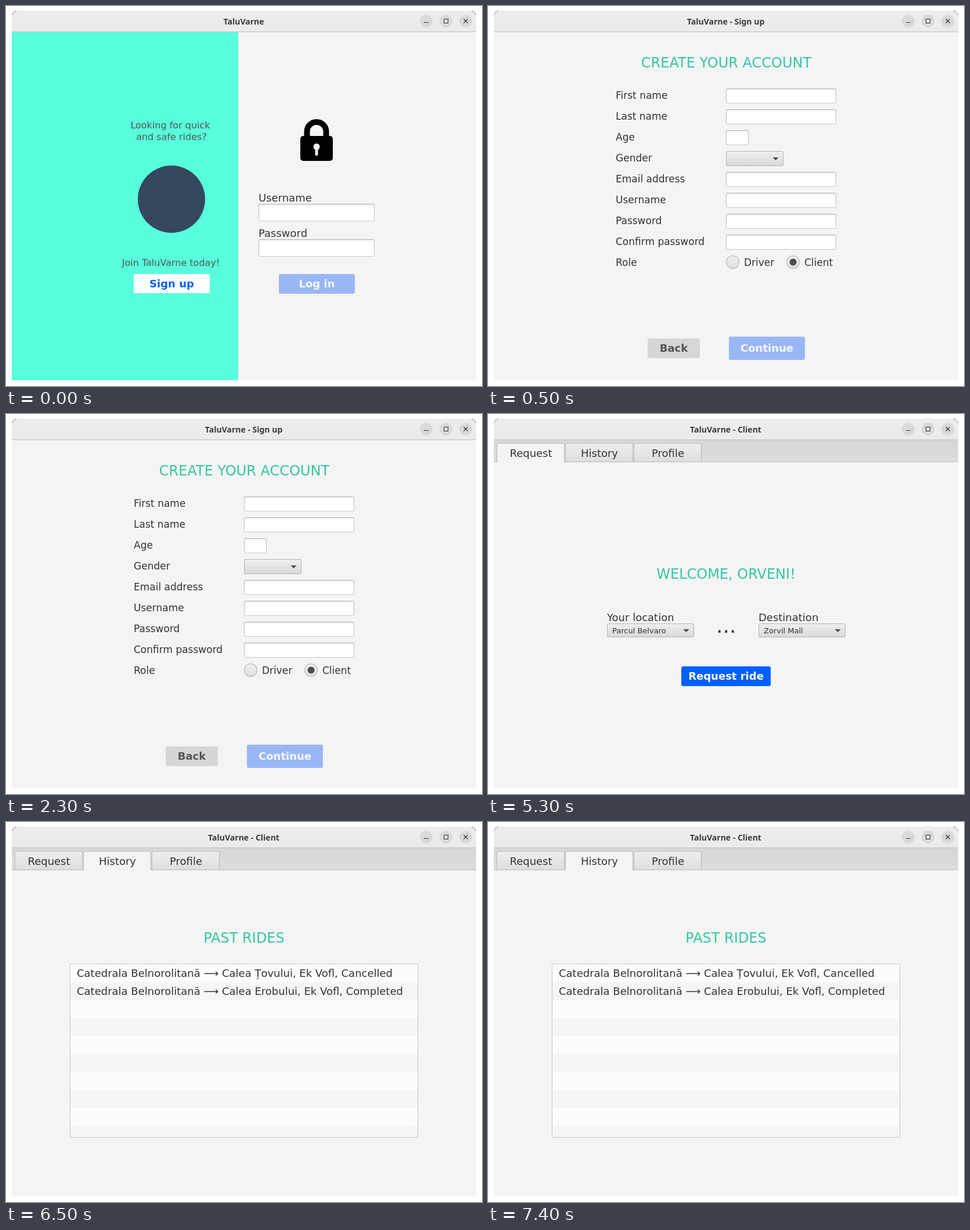
Write an HTML page with a canvas that moves like this. It is 820 px wide and 655 px high and loops after 8000 ms.

```html
<!DOCTYPE html>
<html lang="en">
<head>
<meta charset="utf-8">
<title>TaluVarne</title>
<style>
  html, body { margin: 0; width: 100%; height: 100%; overflow: hidden; background: #fff; }
  canvas { display: block; }
</style>
</head>
<body>
<canvas id="stage" width="820" height="655"></canvas>
<script>
const ctx = document.getElementById('stage').getContext('2d');
const APP = 'TaluVarne';
const SANS = '"DejaVu Sans", sans-serif';
const BG = '#f4f4f4', INK = '#333', TEAL = '#34c6a3', BLUE = '#0060ff', PALE_BLUE = '#9ab7f5';

function text(str, x, y, size, { color = INK, bold = false, align = 'left', family = SANS } = {}) {
  ctx.font = `${bold ? 'bold ' : ''}${size}px ${family}`;
  ctx.fillStyle = color;
  ctx.textAlign = align;
  ctx.fillText(str, x, y);
}

const centered = (str, x, y, size, color = INK) => text(str, x, y, size, { color, align: 'center' });

function rect(x, y, w, h, fill) {
  ctx.fillStyle = fill;
  ctx.fillRect(x, y, w, h);
}

function box(x, y, w, h, radius, fill) {
  ctx.beginPath();
  ctx.roundRect(x, y, w, h, radius);
  ctx.fillStyle = fill;
  ctx.fill();
}

function disc(x, y, r, fill) {
  ctx.beginPath();
  ctx.arc(x, y, r, 0, Math.PI * 2);
  ctx.fillStyle = fill;
  ctx.fill();
}

function line(points, color, width = 1) {
  ctx.beginPath();
  points.forEach(([x, y]) => ctx.lineTo(x, y));
  ctx.strokeStyle = color;
  ctx.lineWidth = width;
  ctx.stroke();
}

function fade(y, h, ...colors) {
  const g = ctx.createLinearGradient(0, y, 0, y + h);
  colors.forEach((c, i) => g.addColorStop(i / (colors.length - 1), c));
  return g;
}

function button(label, x, y, w, h, fill, color) {
  box(x, y, w, h, 3, fill);
  text(label, x + w / 2, y + h / 2 + 6.3, 18, { color, bold: true, align: 'center' });
}

function field(x, y, w, h) {
  box(x, y, w, h, 3, fade(y, h, '#b3b3b3', '#c8c8c8'));
  box(x + 1, y + 1, w - 2, h - 2, 2, '#fff');
  rect(x + 2, y + 1, w - 4, 4, fade(y + 1, 4, '#ececec', '#fff'));
}

function combo(x, y, w, h, label = '') {
  box(x, y, w, h, 3, '#b5b5b5');
  box(x + 1, y + 1, w - 2, h - 2, 2, fade(y, h, '#f0f0f0', '#e3e3e3', '#d9d9d9'));
  const ax = x + w - 13.5, ay = y + h / 2 - 2;
  ctx.beginPath();
  ctx.moveTo(ax - 5, ay);
  ctx.lineTo(ax + 5, ay);
  ctx.lineTo(ax, ay + 5);
  ctx.fillStyle = '#484848';
  ctx.fill();
  text(label, x + 9, y + 17, 13);
}

function radio(x, y, label, selected) {
  disc(x, y, 11.5, '#b5b5b5');
  disc(x, y, 10.5, fade(y - 11, 22, '#efefef', '#dedede'));
  if (selected) disc(x, y, 6, '#4b4b4b');
  text(label, x + 19.5, y + 6.5, 17);
}

function windowFrame(title) {
  rect(0, 0, 820, 655, '#fff');
  rect(10, 44, 800, 601, BG);
  box(10, 8, 800, 36, [9, 9, 0, 0], fade(8, 36, '#ececec', '#ebebeb'));
  rect(10, 44, 800, 1, '#bdbdbd');
  ctx.setLineDash([2, 2]);
  line([[10.5, 15], [12, 12], [14, 10], [18, 8.5]], '#333');
  line([[809.5, 15], [808, 12], [806, 10], [802, 8.5]], '#333');
  ctx.setLineDash([]);
  text(title, 409.5, 32, 14, { bold: true, align: 'center', color: '#3a3a3a', family: '"Noto Sans", "Open Sans", sans-serif' });

  for (const x of [724, 758, 792]) disc(x, 26, 11, '#d9d9d9');
  rect(720, 28, 8, 1, INK);
  ctx.strokeStyle = INK;
  ctx.lineWidth = 1;
  ctx.strokeRect(754.5, 22.5, 7, 7);
  line([[788.5, 22.5], [795.5, 29.5]], INK, 1.3);
  line([[795.5, 22.5], [788.5, 29.5]], INK, 1.3);
}

function padlock() {
  ctx.beginPath();
  ctx.moveTo(518.5, 226);
  ctx.lineTo(518.5, 216.5);
  ctx.arc(535, 216.5, 16.5, Math.PI, 0);
  ctx.lineTo(551.5, 226);
  ctx.strokeStyle = '#000';
  ctx.lineWidth = 10;
  ctx.stroke();
  box(507, 224, 56, 43, 5, '#000');
  disc(535, 242.5, 5.5, BG);
  box(532.5, 243, 5, 15, 2.5, BG);
}

function login() {
  windowFrame(APP);
  rect(10, 45, 390, 600, '#57ffdc');
  centered('Looking for quick', 283, 211, 16, '#555');
  centered('and safe rides?', 285, 231, 16, '#555');
  disc(285, 333, 58, '#34495e');
  centered(`Join ${APP} today!`, 284, 448, 16, '#555');
  button('Sign up', 220, 462, 131, 33, '#fff', BLUE);
  padlock();
  text('Username', 435, 337, 18);
  field(435, 341, 200, 30);
  text('Password', 435, 398, 18);
  field(435, 402, 200, 30);
  button('Log in', 470, 462, 131, 34, PALE_BLUE, '#f4f7fd');
}

function signUp() {
  windowFrame(`${APP} - Sign up`);
  centered('CREATE YOUR ACCOUNT', 410.5, 106, 24, TEAL);
  const labels = ['First name', 'Last name', 'Age', 'Gender', 'Email address',
    'Username', 'Password', 'Confirm password', 'Role'];
  labels.forEach((label, i) => {
    const y = 142 + i * 36;
    text(label, 220, y + 18, 17);
    if (label === 'Gender') combo(410, y, 99, 26);
    else if (label !== 'Role') field(410, y, label === 'Age' ? 39 : 190, 26);
  });
  radio(421.5, 441.5, 'Driver', false);
  radio(525.5, 441.5, 'Client', true);
  button('Back', 275, 573, 90, 34, '#d6d6d6', '#555');
  button('Continue', 415, 570, 131, 40, PALE_BLUE, '#f4f7fd');
}

function clientTabs(active) {
  windowFrame(`${APP} - Client`);
  rect(10, 45, 800, 37, fade(45, 37, '#d8d8d8', '#dcdcdc'));
  rect(10, 82, 800, 1, '#b9b9b9');
  ['Request', 'History', 'Profile'].forEach((label, i) => {
    const x = 15 + i * 118, on = i === active;
    box(x, 50, 117, 33, [3, 3, 0, 0], '#b9b9b9');
    box(x + 1, 51, 115, on ? 32 : 31, [2, 2, 0, 0], on ? BG : fade(51, 31, '#eee', '#dedede'));
    centered(label, x + 59, 74, 18);
  });
}

function request() {
  clientTabs(0);
  centered('WELCOME, ORVENI!', 410, 284, 24, TEAL);
  text('Your location', 205, 357, 18);
  combo(205, 361, 150, 24, 'Parcul Belvaro');
  text('...', 393, 377, 36);
  text('Destination', 466, 357, 18);
  combo(466, 361, 150, 24, 'Zorvil Mall');
  button('Request ride', 333, 435, 154, 34, BLUE, '#fff');
}

function history() {
  clientTabs(1);
  centered('PAST RIDES', 410, 208, 24, TEAL);
  rect(110, 244, 600, 300, '#c8c8c8');
  for (let i = 0; i < 10; i++) {
    const y = 245 + i * 31;
    rect(111, y, 598, Math.min(31, 543 - y), i % 2 ? '#f5f5f5' : '#fcfcfc');
  }
  const from = 'Catedrala Belnorolitană ⟶ Calea';
  text(`${from} Țovului, Ek Vofl, Cancelled`, 122, 267, 18);
  text(`${from} Erobului, Ek Vofl, Completed`, 122, 298, 18);
}

const LOOP = 8000;
const scenes = [[500, login], [3500, signUp], [6500, request], [LOOP, history]];

function tick(now) {
  const t = now % LOOP;
  scenes.find(([end]) => t < end)[1]();
  requestAnimationFrame(tick);
}
requestAnimationFrame(tick);
</script>
</body>
</html>
```
